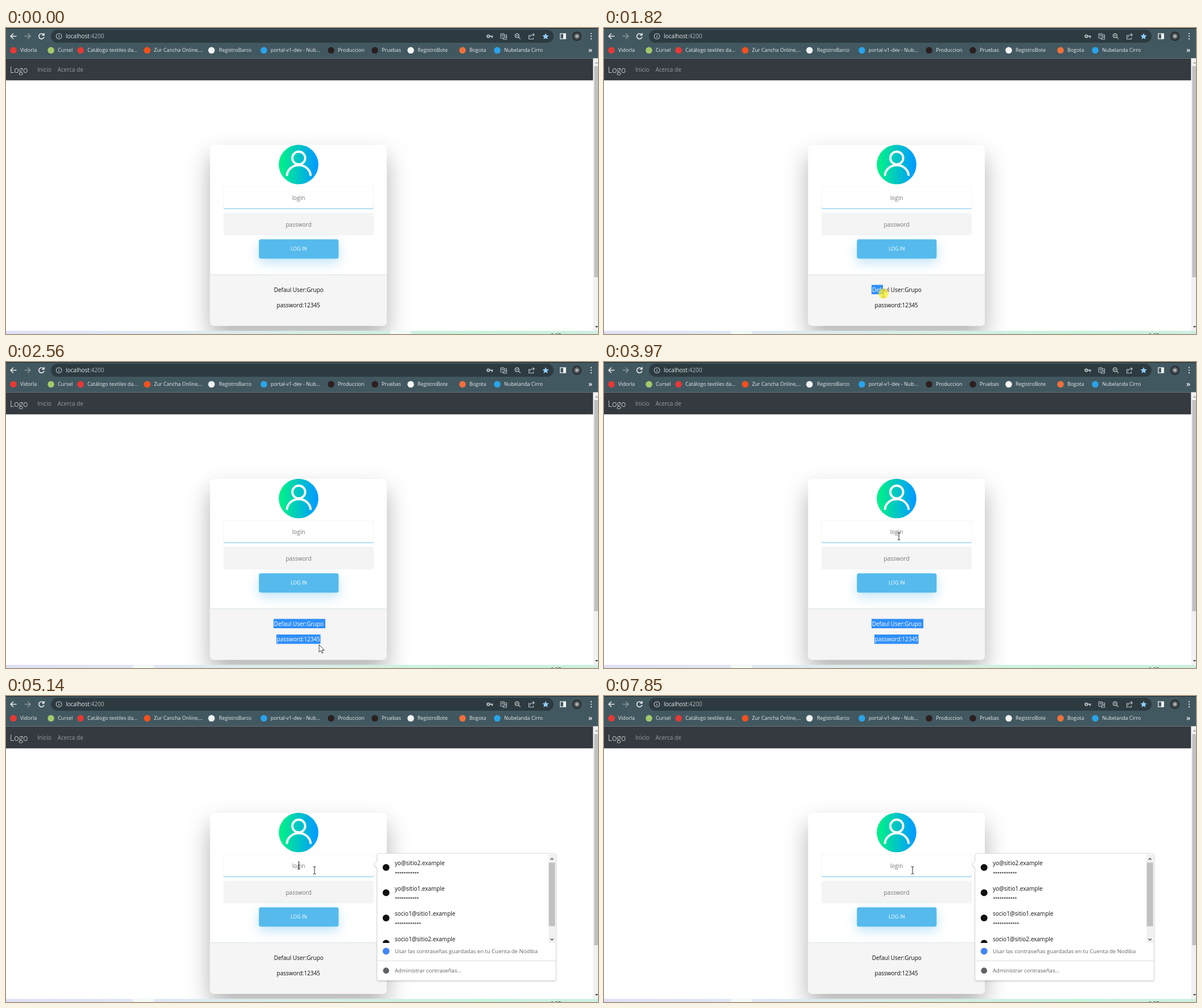
An HTML page that plays this animation: 1040 px wide and 539 px high, repeating every 8000 ms.

```html
<!DOCTYPE html>
<html lang="es">
<head>
<meta charset="utf-8">
<title>Login</title>
<style>
  html, body { margin: 0; width: 100%; height: 100%; overflow: hidden; background: #fff; }
  svg { display: block; width: 1040px; height: 539px; font: 10px "Open Sans", "Noto Sans", sans-serif; }
  .mid { text-anchor: middle; }
  #bookmarks { font-size: 8.9px; fill: #e8eaed; }
  #card { filter: drop-shadow(0 20px 20px rgba(0,0,0,.3)); }
  #button { filter: drop-shadow(0 7px 10px rgba(95,186,233,.4)); }
  #popup > path:first-child { filter: drop-shadow(0 1px 1.5px rgba(0,0,0,.2)); }
</style>
</head>
<body>
<svg viewBox="0 0 1040 539">
  <defs>
    <linearGradient id="avatarFill"><stop offset=".08" stop-color="#00ee8d"/><stop offset=".95" stop-color="#009cff"/></linearGradient>
    <linearGradient id="stripFill">
      <stop stop-color="#dedff6"/><stop offset=".25" stop-color="#e0e8f3"/>
      <stop offset=".5" stop-color="#d8efe9"/><stop offset=".8" stop-color="#c7f2dc"/><stop offset="1" stop-color="#cdeee0"/>
    </linearGradient>
    <radialGradient id="photoFill"><stop stop-color="#d5d8d8"/><stop offset=".5" stop-color="#596063"/><stop offset="1" stop-color="#151819"/></radialGradient>
    <clipPath id="selectionClip"><rect id="row1" x="470" y="452.5" height="16.5"/><rect id="row2" x="475" y="480" height="16.5"/></clipPath>
    <clipPath id="listClip"><rect x="653" y="278" width="300" height="157"/></clipPath>
    <g id="credentials" class="mid"><text x="514.3" y="464.6">Defaul User:Grupo</text><text x="513.7" y="492.3">password:12345</text></g>
  </defs>

  <!-- browser toolbar -->
  <rect width="1040" height="53.5" fill="#425860"/>
  <rect width="1040" height="1" fill="#20292d"/>
  <rect x="79" y="3" width="883" height="23" rx="11.5" fill="#2d3b41"/>
  <g fill="none" stroke="#e8eaed" stroke-width="1.3">
    <path d="M18.5 14.5H8.5M13 9.7l-4.8 4.8 4.8 4.8" stroke-width="1.6"/>
    <path d="M32.5 14.5h10M38 9.7l4.8 4.8-4.8 4.8" stroke="#8b989d" stroke-width="1.6"/>
    <path d="M66 11.8a4.6 4.6 0 1 0 .8 3.9M67 9v3.8h-3.8" stroke-width="1.6"/>
    <g stroke="#bcc5c8">
      <circle cx="93" cy="14.5" r="4.8" stroke-width="1.1"/><path d="M93 13.7v3.4M93 11.4v1.2"/>
      <circle cx="847.3" cy="14.5" r="2.2" stroke-width="1.8"/><path d="M850 14.5h5.5M854 14.5v3" stroke-width="1.8"/>
      <path d="M869 10h6v8h-6zM875 12h4.5v8h-6v-2M870.5 12.5h3M872 12.5v3M875.5 15h3l-2 3" stroke-width="1"/>
      <circle cx="897.8" cy="13.5" r="3.4"/><path d="M900.4 16l3.3 3.4M896.3 13.5h3"/>
      <path d="M920.5 13h-2v6.5h8V17M920.5 16.5q.5-4.5 5-4.5h2.5M925.5 9.5l2.7 2.5-2.7 2.5" stroke-width="1.1"/>
    </g>
    <rect x="973.7" y="10" width="9.5" height="9"/>
  </g>
  <path d="M948 9l1.7 3.7 4 .4-3 2.7.9 4-3.6-2.1-3.6 2.1.9-4-3-2.7 4-.4z" fill="#90cdf8"/>
  <rect x="979" y="10" width="4" height="9" fill="#fff"/>
  <circle cx="1003" cy="14.5" r="8" fill="url(#photoFill)"/>
  <path d="M1028 9.9v.1M1028 14.5v.1M1028 19.1v.1" stroke="#e8eaed" stroke-width="2.2" stroke-linecap="round"/>
  <text x="105" y="18.3" fill="#e8eaed">localhost<tspan fill="#aeb8bc">:4200</tspan></text>
  <g id="bookmarks"></g>
  <text x="1023" y="43" font-size="13" font-weight="600" fill="#fff">»</text>

  <!-- page -->
  <rect y="53.5" width="1031.5" height="38.7" fill="#343a40"/>
  <text x="7" y="79.3" font-size="14.2" font-weight="300" fill="#fff">Logo</text>
  <g fill="#9a9da0"><text x="55" y="76.6">Inicio</text><text x="90.5" y="76.6">Acerca de</text></g>
  <rect x="1031.5" y="53.5" width="8.5" height="480" fill="#f1f1f1"/>
  <rect x="1033.3" y="67" width="6.7" height="372" fill="#c1c1c1"/>
  <path d="M1034.5 62.5l3-3 3 3z" fill="#a3a3a3"/><path d="M1034.5 525l3 3 3-3z" fill="#505050"/>

  <rect id="card" x="358.5" y="206" width="310.5" height="318.5" rx="6.5" fill="#fff"/>
  <path d="M358.5 434h310.5v84a6.5 6.5 0 0 1-6.5 6.5h-297.500a6.5 6.5 0 0 1-6.5-6.5z" fill="#f5f5f5"/>
  <path d="M358.5 434.3h310.5" stroke="#d7e6ee"/>
  <circle cx="514" cy="240.5" r="34.8" fill="url(#avatarFill)"/>
  <g fill="none" stroke="#fff" stroke-width="3.9"><circle cx="514.3" cy="229" r="11.3"/><path d="M493.5 260.5a20.8 19 0 0 1 41.600 0"/></g>
  <rect x="382" y="279" width="264" height="40" rx="3.5" fill="#83caef"/>
  <rect x="382" y="278.7" width="264" height="39" rx="3.5" fill="#f3f3f3"/>
  <rect x="382.7" y="279.5" width="262.6" height="38" rx="3" fill="#fff"/>
  <rect x="382" y="325.5" width="264" height="39.7" rx="3.5" fill="#f4f4f4"/>
  <rect id="button" x="444.3" y="372.3" width="140" height="34" rx="3.5" fill="#56baed"/>
  <g class="mid" fill="#757575">
    <text x="514" y="302.7">login</text><text x="514" y="349.5">password</text>
    <text x="514.3" y="392.4" font-size="8.7" fill="#fff">LOG IN</text>
  </g>
  <use href="#credentials" fill="#0d0d0d"/>
  <g clip-path="url(#selectionClip)">
    <rect x="460" y="450" width="110" height="50" fill="#2f8ffb"/><use href="#credentials" fill="#fff"/>
  </g>
  <path id="caret" d="M514.5 291v15" stroke="#000"/>

  <rect y="533.5" width="1040" height="6" fill="url(#stripFill)"/>
  <rect id="highlight" y="533.5" width="37" height="6" fill="#f2faf8"/>
  <text x="957" y="544.5" font-size="9" fill="#111">9:07</text>

  <!-- saved passwords -->
  <g id="popup">
    <path d="M654 277.5h310a2 2 0 0 1 2 2v219.500a2 2 0 0 1-2 2h-310a2 2 0 0 1-2-2v-196l-5-6 5-6v-11.500a2 2 0 0 1 2-2z" fill="#fff" stroke="#d8d8d8" stroke-width=".7"/>
    <g id="accounts" clip-path="url(#listClip)"></g>
    <rect x="953" y="279" width="12" height="156" fill="#f1f1f1"/>
    <rect x="953.5" y="293.5" width="11" height="112" fill="#c1c1c1"/>
    <path d="M956.5 288.5l2.6-2.6 2.6 2.6M956.5 427.5l2.6 2.6 2.6-2.6" fill="none" stroke="#404040" stroke-width="1.3"/>
    <path d="M652.5 466.5h313" stroke="#dadce0"/>
    <circle cx="667.7" cy="449.5" r="6" fill="#4285f4"/><circle cx="667.7" cy="483.7" r="5.4" fill="#5f6368"/>
    <g fill="#5f6368" font-size="9.6">
      <text x="683" y="453">Usar las contraseñas guardadas en tu Cuenta de Nodiba</text>
      <text x="683" y="487.3">Administrar contraseñas...</text>
    </g>
  </g>

  <g id="cursor">
    <path id="beam" d="M-2.5-6.3h1.500l1 .7 1-.7h1.500M0-5.600v11.200M-2.500 6.300h1.500l1-.7 1 .7h1.500" fill="none" stroke="#222"/>
    <circle id="press" r="8.7" fill="#f6ec2c" opacity=".75"/>
    <path id="arrow" d="M0 0v13l3-2.7 2 4.5 2-.9-2-4.3h4.3z" fill="#fff" stroke="#111" stroke-width=".8"/>
  </g>
</svg>
<script>
const $ = id => document.getElementById(id);
const show = (id, on) => $(id).style.display = on ? '' : 'none';

// icon x, text x, icon colour, label
const bookmarks = [
  [13, 25, '#e53935', 'Vidorla'], [79, 91, '#a3c96b', 'Cursel'],
  [131, 143, '#e53935', 'Catálogo textiles da...'], [248, 260, '#f4511e', 'Zur Cancha Online,...'],
  [361, 374, '#f1f5f6', 'RegistroBarco'], [453, 465, '#29a4ea', 'portal-v1-dev - Nub...'],
  [571, 583, '#2b1f20', 'Produccion'], [648, 660, '#2b1f20', 'Pruebas'],
  [711, 723, '#f5f5f5', 'RegistroBote'], [802, 814, '#f0703c', 'Bogota'],
  [863, 875, '#29a4ea', 'Nubelanda Cirro']
];
$('bookmarks').innerHTML = bookmarks.map(([icon, x, color, label]) =>
  `<circle cx="${icon}" cy="39.3" r="5.8" fill="${color}"/><text x="${x}" y="42.4">${label}</text>`).join('');

const accounts = [['yo@sitio2.example', 11], ['yo@sitio1.example', 11], ['socio1@sitio1.example', 12], ['socio1@sitio2.example', 12]];
$('accounts').innerHTML = accounts.map(([name, dots], i) =>
  `<g transform="translate(0 ${i * 44.5})"><circle cx="667.7" cy="302" r="6" fill="#111"/>
   <text x="683" y="298" fill="#111">${name}</text>
   <path d="M684 311.3h${dots * 3.8 - 1.2}" stroke="#5f6368" stroke-width="2.5" stroke-dasharray="2.6 1.2"/></g>`).join('');

// time, x, y, shape (a: arrow, i: text beam, p: pressed beam)
const moves = [
  [0, 0, 0, ''], [260, 977, 345, 'a'], [400, 892, 362, 'a'], [540, 765, 392, 'a'], [690, 645, 425, 'a'],
  [830, 560, 447, 'a'], [970, 505, 460, 'i'], [1110, 483, 464, 'i'], [1390, 472.5, 464, 'i'],
  [1530, 471.5, 461.5, 'p'], [1670, 476, 463, 'p'], [1810, 491, 468, 'p'], [1950, 515, 481, 'p'],
  [2110, 532, 487.5, 'p'], [2250, 542, 489, 'p'], [2390, 547.5, 489.5, 'p'], [2560, 550, 498, 'a'],
  [3260, 532, 416, 'a'], [3400, 506, 316, 'i'], [3700, 513, 310, 'i'], [3830, 518, 307, 'i'],
  [4120, 517.5, 306.5, 'p'], [4260, 519, 306.5, 'i'], [4400, 526, 307, 'i'], [4540, 536, 307, 'i'], [4690, 542, 307, 'i']
];
// time, selected width in each line
const selections = [
  [0, 0, 0], [1670, 6, 0], [1810, 20, 0], [1950, 91, 28],
  [2110, 91, 44.5], [2250, 91, 57], [2390, 91, 77.5], [4120, 0, 0]
];
const caretToggles = [4120, 4690, 5140, 5690, 6290, 6710, 7270, 7850];

const latest = (list, t) => list.findLast(entry => entry[0] <= t);

function draw() {
  const t = performance.now() % 8000;
  const [, x, y, shape] = latest(moves, t);
  const [, width1, width2] = latest(selections, t);

  $('cursor').setAttribute('transform', `translate(${x} ${y})`);
  show('press', shape === 'p');
  show('beam', shape === 'p' || shape === 'i');
  show('arrow', shape === 'a');
  $('row1').setAttribute('width', width1);
  $('row2').setAttribute('width', width2);
  show('caret', caretToggles.filter(time => time <= t).length % 2);
  show('popup', t >= 4120);
  $('highlight').setAttribute('x', t < 1670 ? 674.5 : 223);
  requestAnimationFrame(draw);
}
draw();
</script>
</body>
</html>
```
